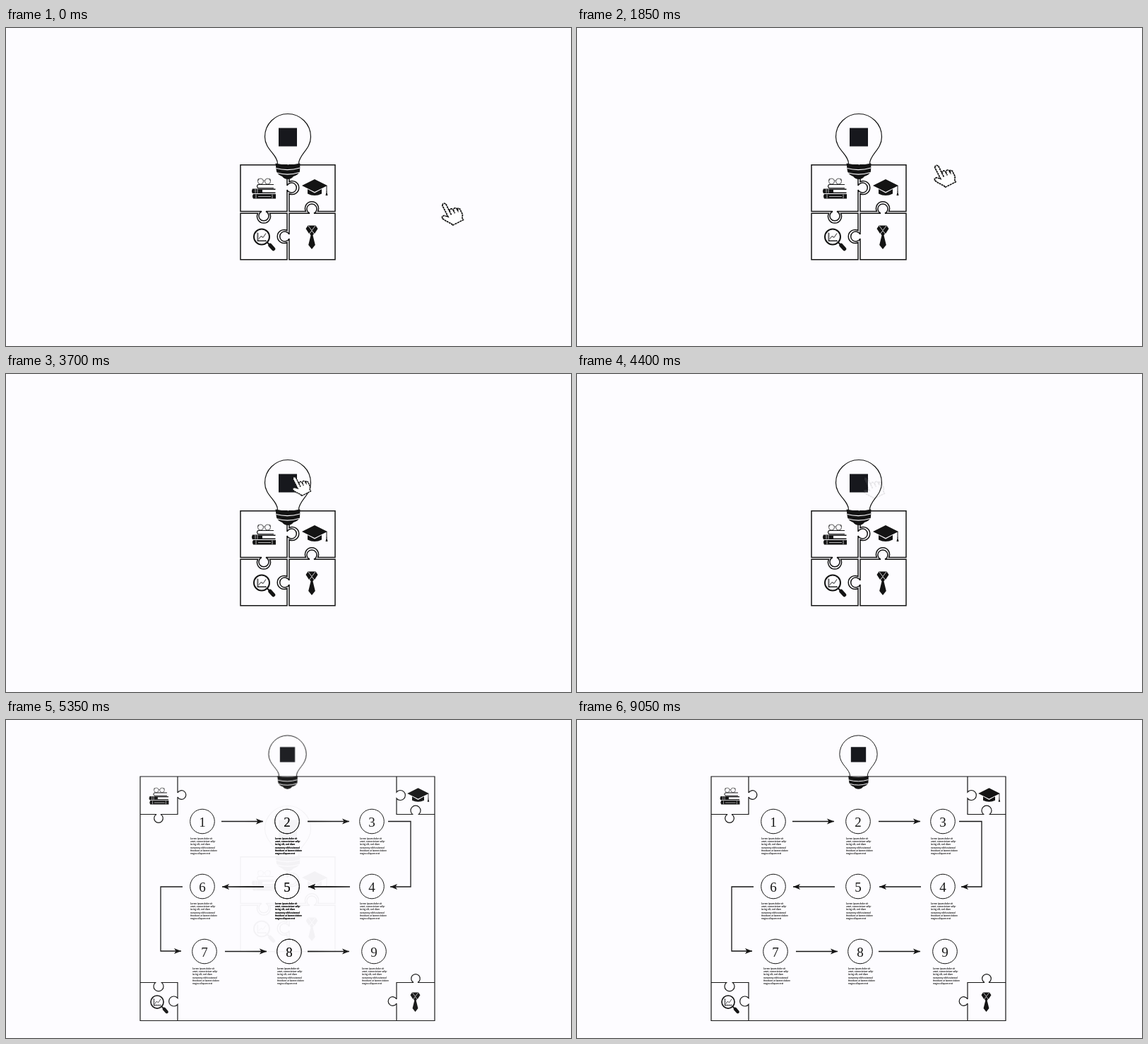
An HTML page that plays this animation: 800 by 450 pixels, repeating every 9900 ms.

```html
<!DOCTYPE html>
<html lang="en">
<head>
<meta charset="utf-8">
<style>
  html, body { margin: 0; width: 100%; height: 100%; overflow: hidden; background: #fdfcff; }
  svg { display: block; width: 100vw; height: 100vh; }
  .line { fill: none; stroke: #141414; }
  .num { font: 19px "Liberation Serif", "Noto Serif", serif; text-anchor: middle; }
  .copy { font: bold 3.25px Lato, "Open Sans", sans-serif; }
</style>
</head>
<body>
<svg viewBox="0 0 800 450" fill="#141414">
  <defs>
    <marker id="head" markerUnits="userSpaceOnUse" markerWidth="12" markerHeight="10" refX="10" refY="5" orient="auto">
      <path d="M0 1L10 5 0 9 2.5 5Z"/>
    </marker>
    <radialGradient id="soft">
      <stop offset=".65" stop-color="#fff"/>
      <stop offset="1" stop-color="#fff" stop-opacity="0"/>
    </radialGradient>
    <mask id="middle" maskUnits="userSpaceOnUse" x="0" y="0" width="800" height="450">
      <ellipse cx="400" cy="235" rx="90" ry="125" fill="url(#soft)"/>
    </mask>

    <g id="bulb">
      <path class="line" stroke-width="1.2" d="M-14.5 38C-14.5 25-32.5 18-32.5 0A32.5 32.5 0 0 1 32.5 0C32.5 18 15.5 25 15.5 38"/>
      <rect x="-13" y="-12.5" width="26" height="26" fill="#17181d"/>
      <path d="M-17.5 37.5Q0 41.500 17.5 37.5L17 49Q15 54 8 56 5 60 0 60T-8 56Q-14 54-16 49Z"/>
      <path d="M-16.5 44.5Q0 49 17 44M-15 51Q0 55.5 16 50.5" fill="none" stroke="#fdfcff" stroke-width="1.2"/>
    </g>

    <g id="books">
      <path class="line" stroke-width=".7" d="M-8.5-10a4 4 0 1 0 8 0a4 4 0 1 0-8 0M1.5-10a4 4 0 1 0 8 0a4 4 0 1 0-8 0M-.5-11h2M-8.5-11l1-3M9.5-11l-1-3"/>
      <path class="line" stroke-width="1.2" d="M14-5.5H-8Q-11-3-8-.5H14"/>
      <path d="M-16 .5H16.5V2H-2V5.5H16.5V7H-16Q-18 4-16 .5ZM-15 8H17V14.5H-15Q-17 11-15 8Z"/>
      <path d="M-12 1v5.5M-9 1v5.5M-11 8.5v5.5M12 8.5v5.5M-8 11.5H10" stroke="#fdfcff" stroke-width=".7"/>
    </g>
    <g id="cap">
      <path d="M-18-3L0-12 18-3 0 6ZM-10 2L0 7.5 10 2V8.5Q0 13.500-10 8.5Z"/>
      <path class="line" d="M17-3V6"/>
      <path d="M17 4l1.5 7h-3Z"/>
    </g>
    <g id="lens">
      <circle class="line" cx="-3" cy="-3" r="11" stroke-width="2"/>
      <path class="line" stroke-width=".9" d="M-9-9V3H4M-7 0l3-4 3 2 4-6"/>
      <path class="line" stroke-width="1.2" stroke-dasharray="1 1" d="M-8-8V3M-8 2H4"/>
      <path class="line" stroke-width="2" d="M5 5l3 3"/>
      <path class="line" stroke-width="5.5" stroke-linecap="round" d="M9 9l4.5 5"/>
    </g>
    <g id="tie">
      <path d="M-5.5-16.5H5.5L8.5-12 4-5 0-9.5-4-5-8.5-12ZM0-8.5L3-5 1.5-2.5 4.8 11 0 17-4.8 11-1.5-2.5-3-5Z"/>
      <path d="M-5-16L0-9.5 5-16" fill="none" stroke="#fdfcff" stroke-width=".8"/>
    </g>
    <path id="hand" d="M5.5 1.5L6.5.5h1L8.5 1.5V8.5L9.5 7.5h1L11.5 8.5V9.5L12.5 8.5h1L14.5 9.5V11L15.5 10 16.5 11V16.5L15 19V21H5.5V19.5L2.5 15 .8 11.5 1.5 10H3L5.5 12.5ZM8.5 8.5v4M11.5 9.5v3M14.5 10.5v2.5"
      fill="#fff" stroke="#141414" stroke-dasharray="1.7 .4"/>
    <g id="flow"></g>
  </defs>

  <g id="puzzle">
    <path class="line" stroke-width="1.5" d="M332 193.7H398V223a7 7 0 1 1 0 6V259.5H368a7 7 0 1 1-6 0H332Z
      M401 193.7H466V259.5H441.5a9.5 9.5 0 1 0-17 0H401V234.5a9.5 9.5 0 1 0 0-17Z
      M332 262.3H356.5a9.5 9.5 0 1 0 17 0H398V286.5a9.5 9.5 0 1 0 0 17V327.7H332Z
      M401 262.3H430a7 7 0 1 1 6 0H466V327.7H401V298a7 7 0 1 1 0-6Z"/>
    <use href="#bulb" x="399" y="154"/>
    <use href="#books" x="365" y="227"/>
    <use href="#cap" x="437" y="226"/>
    <use href="#lens" x="365" y="298.5"/>
    <use href="#tie" x="433" y="296"/>
  </g>

  <g id="board">
    <path class="line" stroke-width="1.2" d="M190 80H607V425.5H190Z
      M243 80V103a6.3 6.3 0 1 1 0 6V133.5H219a6.3 6.3 0 1 1-6 0H190
      M553 80V102a7 7 0 1 1 0 9V133.5H575.5a7 7 0 1 1 9 0H607
      M190 371.5H211.5a7 7 0 1 0 9 0H243V393.5a7 7 0 1 0 0 9V425
      M607 371.5H583a6.3 6.3 0 1 0-6 0H553V395a6.3 6.3 0 1 0 0 6V425"/>
    <use href="#bulb" transform="translate(398.5 48.5) scale(.82)"/>
    <use href="#books" transform="translate(216.5 107.5) scale(.82)"/>
    <use href="#cap" transform="translate(583.5 106.5) scale(.85)"/>
    <use href="#lens" transform="translate(216.5 401.5) scale(.82)"/>
    <use href="#tie" transform="translate(579.5 399) scale(.82)"/>
    <use href="#flow"/>
  </g>
  <g id="centre" mask="url(#middle)"><use href="#flow"/></g>
  <use id="pointer" href="#hand"/>
</svg>
<script>
const $ = id => document.getElementById(id);
const clamp = x => Math.min(1, Math.max(0, x));
const ramp = (t, a, b) => clamp((t - a) / (b - a));
const smooth = x => x * x * (3 - 2 * x);

const copy = ["Lorem ipsum dolor sit", "amet, consectetuer adip-", "iscing elit, sed diam",
  "nonummy nibh euismod", "tincidunt ut laoreet dolore", "magna aliquam erat"];
const arrows = ["M305 143.5H364", "M427 143.5H486", "M541 143.5H573V236H544", "M487 236H428",
  "M365 236H306", "M250 236H219V327H248", "M310 327.5H369", "M427 327.5H486"];

// Steps snake through three rows: right, left, right.
function step(n) {
  const row = Math.floor(n / 3), col = row === 1 ? 2 - n % 3 : n % 3;
  const x = 278 + col * 120 + (row === 2 ? 3 : 0), y = 143.5 + row * 92;
  const lines = copy.map((s, i) =>
    `<text class="copy" x="${x - 17}" y="${y + 25.7 + i * 4.1}">${s}</text>`).join("");
  return `<circle class="line" cx="${x}" cy="${y}" r="17.3"/>
    <text class="num" x="${x}" y="${y + 7}">${n + 1}</text>${lines}`;
}
$("flow").innerHTML = [...Array(9).keys()].map(step).join("") +
  arrows.map(d => `<path class="line" stroke-width="1.3" marker-end="url(#head)" d="${d}"/>`).join("");

// Travel with a short speed-up, steady middle and longer slow-down.
function glide(u) {
  const up = .13, down = .386, v = 1 / (1 - (up + down) / 2);
  if (u < up) return v * u * u / (2 * up);
  if (u > 1 - down) return 1 - v * (1 - u) ** 2 / (2 * down);
  return v * (u - up / 2);
}

function draw(now) {
  const t = now % 9900;
  const p = glide(ramp(t, 500, 3475));
  const press = smooth(ramp(t, 3530, 3700)) - smooth(ramp(t, 3750, 3950));
  const size = 1 - .14 * press;
  const hand = $("pointer");
  hand.setAttribute("transform", `translate(${619.5 - 212 * p} ${248.5 - 102.5 * p})
    rotate(-27) scale(${1.8 * size} ${1.62 * size}) translate(-7 -.5)`);
  hand.setAttribute("opacity", 1 - ramp(t, 3950, 4450));

  // The middle of the new board comes in ahead of its edges.
  const k = smooth(ramp(t, 4550, 5450));
  $("puzzle").setAttribute("opacity", 1 - k);
  $("board").setAttribute("opacity", k);
  $("centre").setAttribute("opacity", k < 1 ? clamp(2.2 * k) : 0);
}
const start = performance.now();
function tick() {
  draw(performance.now() - start);
  requestAnimationFrame(tick);
}
tick();
</script>
</body>
</html>
```
